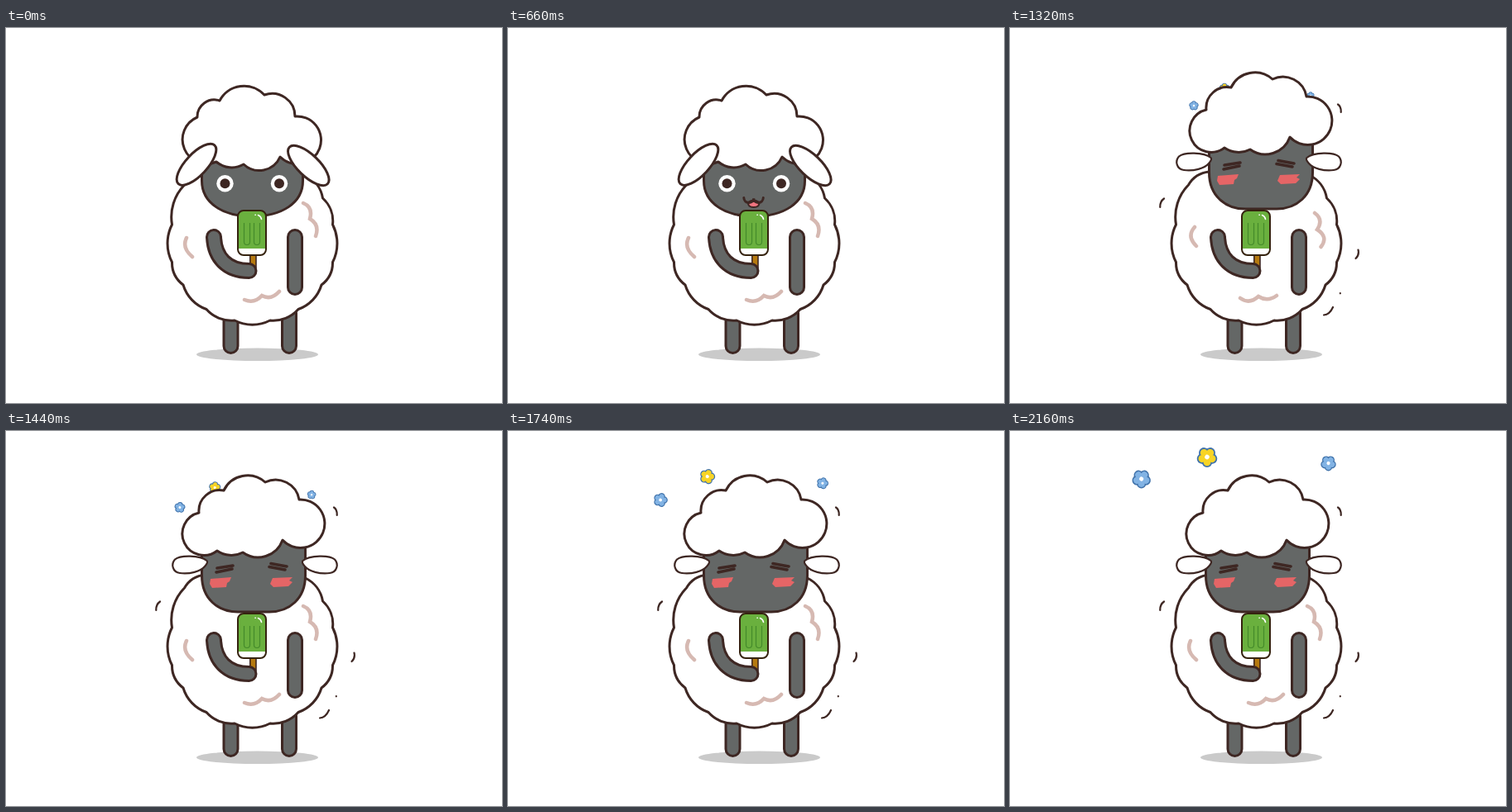
Recreate the animation shown at these times as an HTML page. Size 599x454 px, loop 2190 ms.

```html
<!DOCTYPE html>
<html lang="en">
<head>
<meta charset="utf-8">
<title>Sheep with an ice lolly</title>
<style>
  html, body { margin: 0; width: 100%; height: 100%; overflow: hidden; background: #fff; }
  svg { display: block; }
  .line { stroke: #3e2723; stroke-width: 3; stroke-linejoin: round; }
  .wool { fill: #fff; }
  .skin { fill: #646766; }
  .rim, .limb, .curl, .ink { fill: none; stroke: #3e2723; stroke-linecap: round; }
  .rim { stroke-width: 20; }
  .limb { stroke: #646766; stroke-width: 14; }
  .curl { stroke: #d6b9b2; stroke-width: 4.5; }
</style>
</head>
<body>
<svg width="599" height="454" viewBox="0 0 599 454">
  <defs>
    <path id="legs" d="M271.5 345V385M342 345V385"/>
    <path id="arms" d="M251 253C252 278 267 294 293.5 294M349 253V314"/>
    <path id="ear" d="M238.5 157C230 150 206 150 200 155.5C195 161 197 171 206 172C218 173.5 231 170 236 164Q240.5 159 238.5 157Z"/>
    <path id="groove" d="M287.5 236V259Q287.5 262.5 291 262.5T294.5 259V236"/>
    <g id="eye"><circle r="10.2" fill="#fff"/><circle r="6" fill="#3e2723"/></g>
    <g id="petals"></g>
  </defs>

  <ellipse cx="303.5" cy="395.3" rx="73.5" ry="7.7" fill="#cacaca"/>
  <use href="#legs" class="rim"/><use href="#legs" class="limb"/>
  <path id="fleece" class="line wool"/>
  <path id="curlsA" class="curl" d="M359 212Q371 217 367 231Q379 238 374 252M218 254Q212 266 225 277M288 329Q300 334 309 324Q320 330 330 319"/>
  <path id="curlsB" class="curl" d="M368 224Q379 232 371 244Q385 253 375.5 265M223 241Q213 252 225 264M278 327Q289 335 300 325Q311 332 322 324"/>
  <g id="flowers"></g>

  <g id="calm">
    <path class="line skin" d="M236.5 150V185C236.5 212 262 228 297 228C333 228 358.5 212 358.5 185V150Z"/>
    <path id="hairA" class="line wool"/>
    <g class="line wool">
      <ellipse rx="32" ry="13" transform="translate(230 165.3) rotate(-47)"/>
      <ellipse rx="32" ry="13" transform="translate(365.3 166.5) rotate(44)"/>
    </g>
    <use href="#eye" x="264.5" y="188.3"/><use href="#eye" x="330" y="188.3"/>
  </g>

  <g id="dizzy">
    <path class="line skin" d="M236.5 120V175C236.5 203 256 219 280 219H318C342 219 361.5 203 361.5 175V120Z"/>
    <path id="hairB" class="line wool"/>
    <path class="ink" stroke-width="3.6" d="M255 166L274 163M254 171L273 167M320 160.5L339 164M318 164.5L337 168"/>
    <path fill="#e56566" d="M247 179L272 177L270 182L267 184L266 189L249 190L246 185ZM322 178L346 177L342 181L346 183L341 188L323 189L319 185Z"/>
    <g id="ears" class="wool" stroke="#3e2723" stroke-width="2.2">
      <use href="#ear"/><use href="#ear" transform="translate(593 0) scale(-1 1)"/>
    </g>
  </g>

  <path fill="#b5790f" stroke="#3e2723" stroke-width="1.6" d="M294.8 272H302V290H294.8Z"/>
  <rect x="280" y="221" width="34" height="54" rx="7" fill="#6ab03e"/>
  <path fill="#fff" d="M280 267H314Q314 275 307 275H287Q280 275 280 267Z"/>
  <rect x="280" y="221" width="34" height="54" rx="7" fill="none" stroke="#35230f" stroke-width="2"/>
  <g fill="none" stroke="#448a2b" stroke-width="1.2"><use href="#groove"/><use href="#groove" x="12"/></g>
  <path fill="none" stroke="#fff" stroke-width="1.6" stroke-linecap="round" d="M304.5 226.5Q308 228 308.5 231.5M301 226.2h.3"/>
  <use href="#arms" class="rim"/><use href="#arms" class="limb"/>

  <g id="mouth">
    <path id="tongue" fill="#f0747f" stroke="#3e2723" stroke-width="2"/>
    <path class="ink" stroke-width="3" d="M284.8 205.5C285 213 296 213.5 296.7 206.5C297.4 213.5 308 213 308.3 205.5"/>
  </g>
  <path id="shakes" class="ink" stroke-width="2.2" d="M396 92.5Q400 95 399.7 102M186 206.5Q181 210 181.3 217M420.5 268.5Q422 275 417.5 279M379 347.5Q386 347 390 338M398.8 321v.3"/>
</svg>
<script>
const LOOP = 2190, STEP = 30, BITE = 270, SWALLOW = 810, DIZZY = 1200;
const $ = id => document.getElementById(id);
const show = (id, on) => $(id).setAttribute('display', on ? 'inline' : 'none');
const move = (id, x, y) => $(id).setAttribute('transform', `translate(${x} ${y})`);
const clamp = v => Math.min(1, Math.max(0, v));

// Closed clockwise outline of arcs through the notches; bulge is arc height over chord.
function woolly(id, bulge, notches) {
  let [x0, y0] = notches[notches.length - 1];
  let d = `M${x0} ${y0}`;
  for (const [x, y, b = bulge] of notches) {
    const r = Math.hypot(x - x0, y - y0) * (1 + 4 * b * b) / (8 * b);
    d += `A${r} ${r} 0 ${+(b > 0.5)} 1 ${x} ${y}`;
    [x0, y0] = [x, y];
  }
  $(id).setAttribute('d', d + 'Z');
}

// The belly is the same on both sides of x = 297.5.
const belly = [[97, -24], [97, 21.5], [83.5, 49], [55.5, 78.5], [21.5, 92]];
const mirrored = belly.map(([x, y]) => [-x, y]).reverse();
const place = ([x, y]) => [297.5 + x, 262 + y];
woolly('fleece', 0.12, [[64, -84], [85, -56], ...belly, ...mirrored, [-82, -72], [-57, -88]].map(place));

woolly('hairA', 0.26, [
  [258, 88], [312, 81], [349, 107], [331, 156, 0.79], [287, 165], [254, 162, 0.16], [231, 108, 0.5]
]);
woolly('hairB', 0.25, [
  [263, 72], [313, 62], [354, 83], [334, 132, 0.79], [286, 147], [255, 145, 0.14], [233, 99, 0.62]
]);

// Each flower drifts along a curve: start, control, end.
const BLUE = '#82b3e4', YELLOW = '#f8d426';
const flowers = [
  { fill: BLUE, size: 1.1, path: [[222, 94], [178, 91], [158.7, 58]] },
  { fill: YELLOW, size: 1.2, path: [[259, 73], [233, 58], [238, 31.5]] },
  { fill: BLUE, size: 0.9, path: [[363, 82], [386, 66], [384.5, 39]] }
];
$('petals').innerHTML = [0, 1, 2, 3, 4].map(i =>
  `<circle cy="-5.3" r="3.7" transform="rotate(${i * 72})"/>`).join('') + '<circle r="4"/>';
$('flowers').innerHTML = flowers.map(f => `<g>
  <use href="#petals" stroke="#4173ab" stroke-width="3"/>
  <use href="#petals" fill="${f.fill}"/><circle r="2.3" fill="#fff"/></g>`).join('');

const bezier = (a, b, c, p) => (1 - p) ** 2 * a + 2 * p * (1 - p) * b + p * p * c;

function draw(t) {
  const dizzy = t >= DIZZY;
  const beat = Math.floor((t - DIZZY) / 60);
  const sway = dizzy && beat % 4 >= 2;

  show('calm', !dizzy);
  show('dizzy', dizzy);
  show('flowers', dizzy);
  show('shakes', dizzy);
  show('curlsA', !sway);
  show('curlsB', sway);

  const lift = clamp((t - SWALLOW) / 300);
  move('calm', 0, -4 * lift * lift * (3 - 2 * lift));
  move('dizzy', sway && beat % 8 < 4 ? 4 : 0, 0);
  move('ears', sway ? 0 : 4, 0);

  show('mouth', t >= BITE && t < SWALLOW);
  const lick = clamp((t - BITE) / 360);
  const tip = 217 + 21 * Math.sin(Math.PI * lick) ** 2;
  $('tongue').setAttribute('d',
    `M290 211Q296.7 206 303.4 211Q304 ${tip} 296.7 ${tip}Q289.4 ${tip} 290 211Z`);

  const p = (t - 1320) / 840;
  flowers.forEach(({ size, path: [a, b, c] }, i) => {
    const [x, y] = [0, 1].map(k => bezier(a[k], b[k], c[k], p));
    $('flowers').children[i].setAttribute('transform',
      `translate(${x} ${y}) scale(${size * (1 + p) / 2}) rotate(${p * 36})`);
  });
}

const start = performance.now();
function tick() {
  const t = (performance.now() - start) % LOOP;
  draw(Math.floor(t / STEP) * STEP);
  requestAnimationFrame(tick);
}
tick();
</script>
</body>
</html>
```
